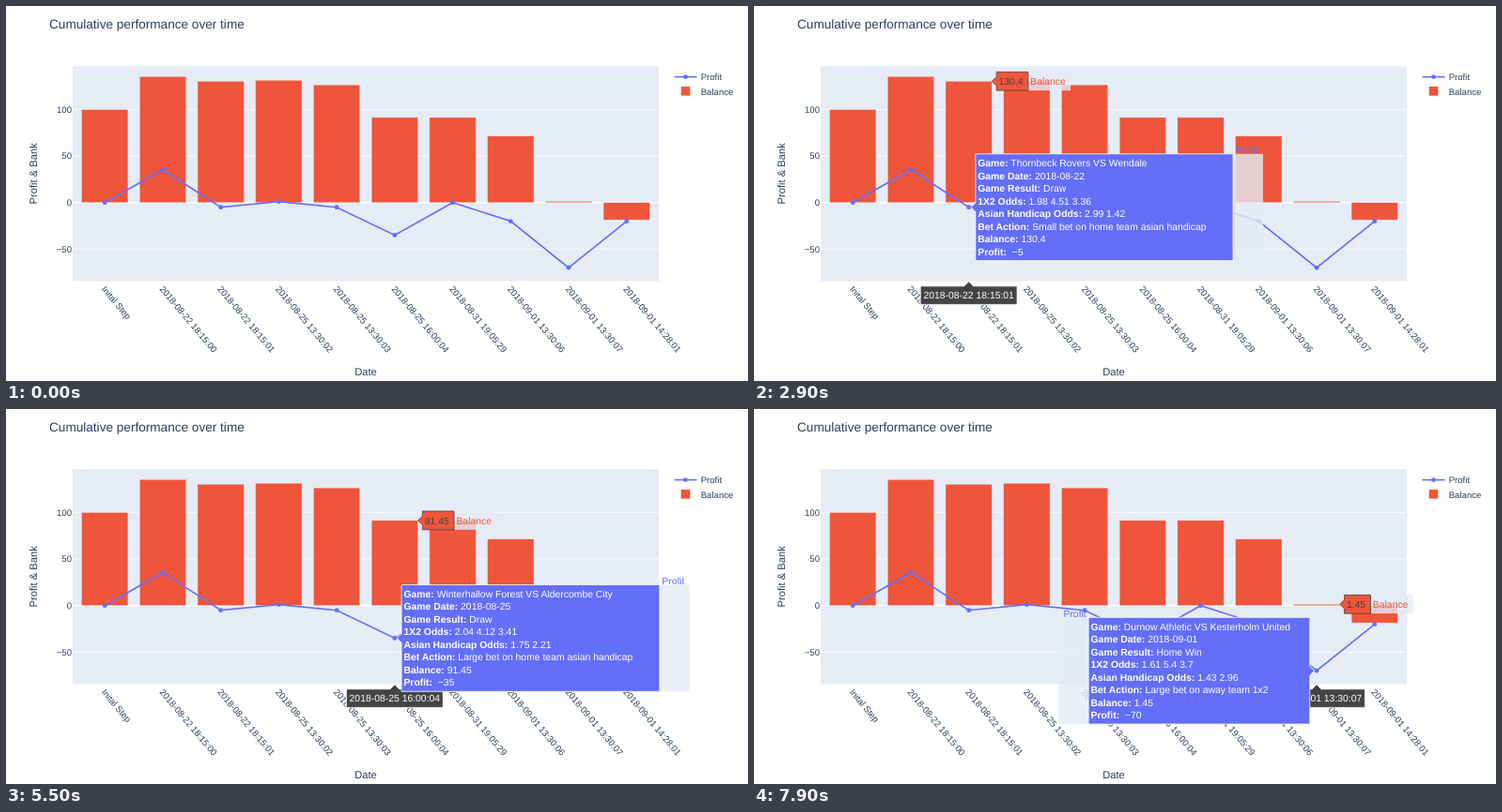
An HTML page for the animation above (8 s loop, 790 by 400 pixels).

```html
<!DOCTYPE html>
<html lang="en">
<head>
<meta charset="utf-8">
<title>Cumulative performance over time</title>
<style>
  html, body { margin: 0; width: 100%; height: 100%; overflow: hidden; background: #fff; }
  svg { display: block; width: 790px; height: 400px; }
  text { font-family: "Liberation Sans", Arial, sans-serif; font-size: 9.6px; fill: #2a3f5f; white-space: pre; text-rendering: geometricPrecision; }
  .axis { font-size: 11.2px; text-anchor: middle; }
  .hover text { font-size: 10.4px; }
  .hover b, .bold { font-weight: bold; }
</style>
</head>
<body>
<svg id="stage" viewBox="0 0 790 400"></svg>
<script>
const LOOP = 8000, FADE_STEPS = 6;
const BLUE = '#636efa', RED = '#ef553b', PLOT = '#e5ecf6', DARK = '#444';
const X0 = 105.2, STEP = 61.73, BAR = STEP * 0.8;
const px = i => X0 + i * STEP;
const py = v => 209.7 - v * 0.993;
const minus = v => String(v).replace('-', '\u2212');

const dates = ['Inital Step', '2018-08-22 18:15:00', '2018-08-22 18:15:01', '2018-08-25 13:30:02',
  '2018-08-25 13:30:03', '2018-08-25 16:00:04', '2018-08-31 19:05:29', '2018-09-01 13:30:06',
  '2018-09-01 13:30:07', '2018-09-01 14:28:01'];
const profit = [0, 35.4, -5, 1.05, -5, -35, 0, -20, -70, -20];
const balance = [100, 135.4, 130.4, 131.45, 126.45, 91.45, 91.45, 71.45, 1.45, -18.55];

// start time, box width, game, result, 1X2 odds, handicap odds, bet
const hovers = [
  [700, 160, 'None', 'None', 'None', 'None', 'None'],
  [1900, 203, 'Ostler Vale VS Brantmoor', 'Draw', '2.62 2.77 3.53', '1.49 2.75', 'Medium bet on draw 1x2'],
  [2900, 274.2, 'Thornbeck Rovers VS Wendale', 'Draw', '1.98 4.51 3.36', '2.99 1.42', 'Small bet on home team asian handicap'],
  [3700, 271.5, 'Fennock Town VS Orrinvale County', 'Away Win', '2.31 3.25 3.4', '3.9 1.21', 'Small bet on away team asian handicap'],
  [4600, 218.8, 'Velby City VS Marl City', 'Home Win', '1.917 4.62 3.48', '1.63 2.41', 'Small bet on away team 1x2'],
  [5500, 274.8, 'Winterhallow Forest VS Aldercombe City', 'Draw', '2.04 4.12 3.41', '1.75 2.21', 'Large bet on home team asian handicap'],
  [6200, 219, 'Pellmarsh Town VS Garrow Albion', 'Away Win', '2.2 3.3 3.5', '1.92 1.98', 'No bet'],
  [6900, 264, 'Aldercombe City VS Dukes Moor Rangers', 'Draw', '2.05 3.4 3.4', '1.75 2.2', 'Medium bet on home team 1x2'],
  [7900, 235.7, 'Durnow Athletic VS Kesterholm United', 'Home Win', '1.61 5.4 3.7', '1.43 2.96', 'Large bet on away team 1x2'],
];

const rect = (x, y, w, h, fill, extra = '') =>
  `<rect x="${x}" y="${y}" width="${w}" height="${h}" fill="${fill}" ${extra}/>`;
const text = (x, y, s, extra = '') => `<text x="${x}" y="${y}" ${extra}>${s}</text>`;
const path = (d, fill, stroke, width = 0.8) =>
  `<path d="${d}" fill="${fill}" stroke="${stroke}" stroke-width="${width}"/>`;
const dot = (x, y) => `<circle cx="${x}" cy="${y}" r="2.4" fill="${BLUE}"/>`;
const fill = c => `style="fill:${c}"`;

const measure = document.createElement('canvas').getContext('2d');
measure.font = '10.4px "Liberation Sans", Arial, sans-serif';
const widthOf = s => measure.measureText(s).width;

function chart() {
  let s = rect(71, 64.3, 624, 229.2, PLOT);
  for (const v of [-50, 0, 50, 100]) {
    s += path(`M71 ${py(v)}H695`, 'none', '#fff', v ? 0.8 : 1.6);
    s += text(70, py(v) + 3.4, minus(v), 'text-anchor="end"');
  }
  balance.forEach((v, i) => {
    s += rect(px(i) - BAR / 2, py(Math.max(v, 0)), BAR, Math.abs(v) * 0.993, RED, `stroke="${PLOT}" stroke-width=".4"`);
  });
  s += path('M' + profit.map((v, i) => `${px(i)} ${py(v)}`).join('L'), 'none', BLUE, 1.6);
  s += profit.map((v, i) => dot(px(i), py(v))).join('');
  dates.forEach((d, i) => {
    s += text(0, 0, d, `transform="translate(${px(i) - 3.9} 302.2) rotate(50)"`);
  });
  s += text(46, 24, 'Cumulative performance over time', 'style="font-size:13.6px"');
  s += text(383, 394, 'Date', 'class="axis"');
  s += text(0, 0, 'Profit &amp; Bank', 'class="axis" transform="translate(33 178.8) rotate(-90)"');
  s += path('M711.5 75.6H735.5', 'none', BLUE, 1.6) + dot(723.5, 75.6) + text(739.7, 79, 'Profit');
  return s + rect(718.7, 86, 9.6, 9.6, RED) + text(739.7, 95, 'Balance');
}

// Box with a pointer whose tip is at (x, y); dir is 1 to the right, -1 to the left.
function callout(x, y, w, h, dir, color, border, name, nameY) {
  const nameW = widthOf(name) + 7.7, near = x + dir * 4.8, far = near + dir * w;
  return rect(dir > 0 ? far : far - nameW, y - h / 2, nameW, h, PLOT, 'fill-opacity=".8"') +
    path(`M${x} ${y}L${near} ${y - 4.8}V${y - h / 2}H${far}V${y + h / 2}H${near}V${y + 4.8}Z`, color, border) +
    text(far + dir * 2.4, nameY, name, `${fill(color)} text-anchor="${dir > 0 ? 'start' : 'end'}"`);
}

function hover([, w, game, result, odds, handicap, bet], i) {
  const x = px(i), half = widthOf(dates[i]) / 2 + 3.2;
  let s = path(`M${x} 293.8L${x + 4.8} 298.8H${x + half}V318.4H${x - half}V298.8H${x - 4.8}Z`, DARK, '#fff');
  s += text(x, 312.2, dates[i], `${fill('#fff')} text-anchor="middle"`);

  const bx = x + BAR / 2, by = py(balance[i]);
  s += callout(bx, by, widthOf(balance[i]) + 7.7, 19.8, 1, RED, DARK, 'Balance', by + 3.7);
  s += text(bx + 7.2, by + 3.7, balance[i], fill(DARK));

  const dir = i < 7 ? 1 : -1, y = py(profit[i]), h = 113.8, top = y - h / 2;
  const left = dir > 0 ? x + 7.2 : x - 7.2 - w;
  s += callout(x + dir * 2.4, y, w, h, dir, BLUE, '#fff', 'Profit', top - 0.8);
  const lines = [['Game', game], ['Game Date', i ? dates[i].slice(0, 10) : 'None'], ['Game Result', result],
    ['1X2 Odds', odds], ['Asian Handicap Odds', handicap], ['Bet Action', bet],
    ['Balance', balance[i]], ['Profit', '\u00a0' + minus(profit[i])]];
  lines.forEach(([label, value], n) => {
    s += text(left + 2.4, top + 13.3 + n * 13.52, `<tspan class="bold">${label}:</tspan> ${value}`, fill('#fff'));
  });
  return `<g class="hover" opacity="0">${s}</g>`;
}

const stage = document.getElementById('stage');
stage.innerHTML = chart() + hovers.map(hover).join('');
const groups = [...stage.querySelectorAll('.hover')];

function draw(now) {
  const t = now % LOOP;
  const active = hovers.findLastIndex(h => t >= h[0]);
  const fade = Math.min(1, (Math.floor((t - hovers[0][0]) / 100) + 1) / FADE_STEPS);
  groups.forEach((g, i) => g.setAttribute('opacity', i === active ? fade : 0));
}

const start = performance.now();
function tick() {
  draw(performance.now() - start);
  requestAnimationFrame(tick);
}
tick();
</script>
</body>
</html>
```
